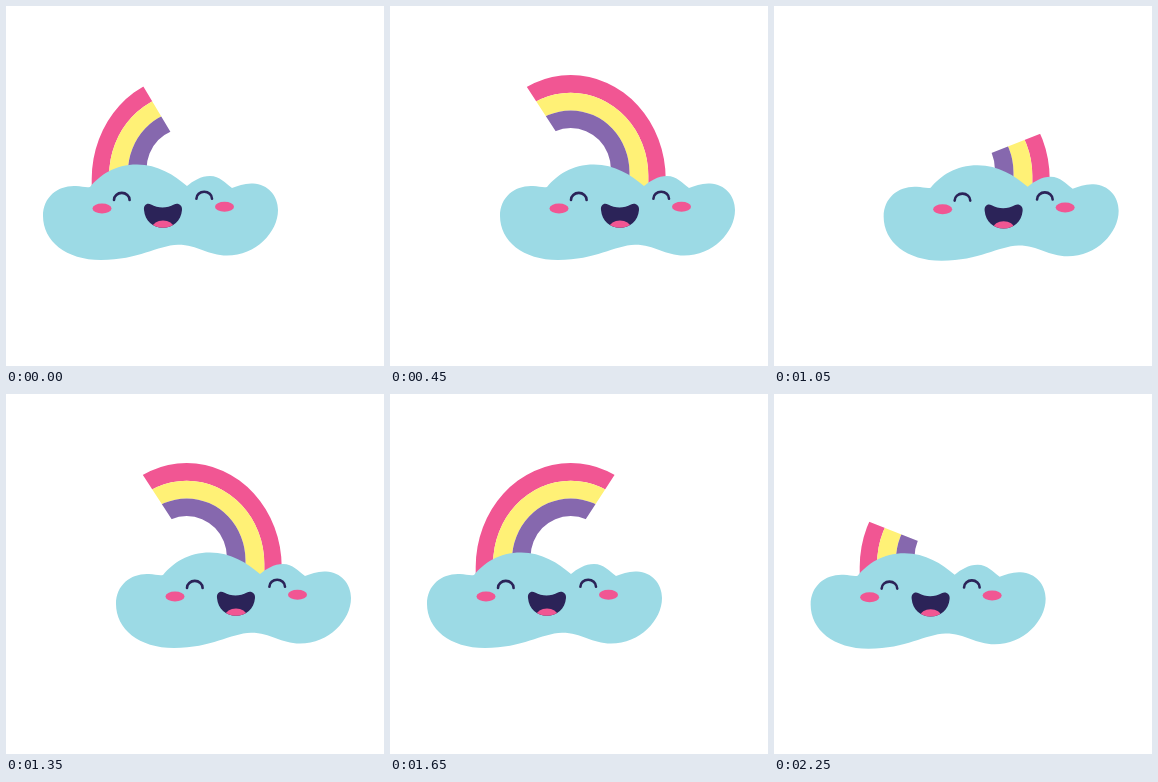
Animation of 378x360 px, one loop 2.4 s. Source, as an HTML page with a canvas:

```html
<!DOCTYPE html>
<html lang="en">
<head>
<meta charset="utf-8">
<title>Cloud and rainbow</title>
<style>
html, body { margin: 0; width: 100%; height: 100%; overflow: hidden; background: #fff; }
canvas { display: block; }
</style>
</head>
<body>
<canvas id="stage" width="378" height="360"></canvas>
<script>
const ctx = document.getElementById('stage').getContext('2d');
const STEP = 150, STEPS = 16;
const AXIS = 180.7;
const PINK = '#f15693', YELLOW = '#fff176', PURPLE = '#8668ae';
const SKY = '#9cdae5', NAVY = '#2b2358';

// Half widths of the band edges, from the outside in.
const EDGES = [95, 77.6, 58.8, 40.2];

// Each cut runs from the outer to the inner edge of the rainbow.
const CUTS = {
  tip: [96, 128, 143, 146.5],
  rising: [138, 81.5, 164, 125],
  long: [224.5, 81, 196.5, 124],
  end: [266, 126.7, 218.5, 145.8]
};

const cloud = new Path2D(`M37 210 C37 190 53 179 70 180 C76 180 80 182 84 181
  C94 169 109 158.5 131 158.5 C152 158.5 168 169 181 180 C187 175 195 170 204 170
  C214 170 219 177 226 182 C232 180 239 177 247 177.5 C262 178 272 190 272 204
  C272 226 250 249.6 221 249.6 C202 249.6 192 238.8 172 238.8
  C151 239.5 133 254 95 254 C60 254 37 235 37 210Z`);
const mouth = new Path2D(`M138 204 C137.5 199 141 196.5 145 198.5
  C152 202.5 161 202.5 168 198.5 C172 196.5 176.5 199 176 204
  C175 215 167 221.7 157 221.7 C147 221.7 139 215 138 204Z`);

function ellipse(x, y, rx, ry, color) {
  ctx.fillStyle = color;
  ctx.beginPath();
  ctx.ellipse(x, y, rx, ry, 0, 0, Math.PI * 2);
  ctx.fill();
}

function eye(x, y) {
  ctx.beginPath();
  ctx.ellipse(x, y, 7.8, 7, 0, Math.PI, Math.PI * 2);
  ctx.stroke();
}

// Keeps the part of the rainbow between its foot and the cut.
function clipAt(cut, mirrored) {
  const [x1, y1, x2, y2] = CUTS[cut];
  const nearX = x2 + (x2 - x1) * 0.4, nearY = y2 + (y2 - y1) * 0.4;
  const angle = Math.atan2(y1 - y2, x1 - x2);
  const shape = new Path2D(), side = new Path2D();
  shape.moveTo(nearX, nearY);
  shape.arc(nearX, nearY, 500, angle, Math.PI / 2, true);
  shape.closePath();
  side.addPath(shape, mirrored ? new DOMMatrix([-1, 0, 0, 1, AXIS * 2, 0]) : new DOMMatrix());
  ctx.clip(side);
}

function edge(i, reverse) {
  const ry = 104 - i * 21, cy = 173 - i * 3.3;
  ctx.ellipse(AXIS, cy, EDGES[i], ry, 0, reverse ? 0 : Math.PI, reverse ? Math.PI : 0, reverse);
}

function rainbow(cut, mirrored) {
  ctx.save();
  clipAt(cut, mirrored);
  if (cut === 'end') clipAt(cut, !mirrored);
  [PINK, YELLOW, PURPLE].forEach((color, i) => {
    const outer = EDGES[i], inner = EDGES[i + 1];
    ctx.fillStyle = color;
    ctx.beginPath();
    ctx.moveTo(AXIS - outer, 200);
    edge(i, false);
    ctx.lineTo(AXIS + outer, 200);
    ctx.lineTo(AXIS + inner, 200);
    edge(i + 1, true);
    ctx.lineTo(AXIS - inner, 200);
    ctx.fill();
  });
  ctx.restore();
}

function drawCloud(x, y) {
  ctx.save();
  ctx.translate(x, y);
  ctx.fillStyle = SKY;
  ctx.fill(cloud);
  ctx.strokeStyle = NAVY;
  ctx.lineWidth = 2.6;
  ctx.lineCap = 'round';
  eye(115.8, 193.9);
  eye(198.2, 192.7);
  ellipse(96, 202.5, 9.5, 5, PINK);
  ellipse(218.5, 200.8, 9.5, 5, PINK);
  ctx.fillStyle = NAVY;
  ctx.fill(mouth);
  ctx.clip(mouth);
  ellipse(157, 221.3, 10.5, 6.7, PINK);
  ctx.restore();
}

function draw(now) {
  const step = (Math.floor(now / STEP) + 2) % STEPS;
  // Position between the left rest (0) and the right rest (8).
  const place = step <= 8 ? step : STEPS - step;
  const fromRest = Math.min(place, 8 - place);
  const cut = [null, 'tip', 'rising', 'long', 'end'][fromRest];

  ctx.fillStyle = '#fff';
  ctx.fillRect(0, 0, 378, 360);
  if (cut) rainbow(cut, place > 4);

  const x = place === 4 ? 36.5 : place < 4 ? 0 : 73;
  const settle = fromRest < 2 ? 0.7 : 0;
  drawCloud(x - settle / 2, place === 4 ? 17.7 : settle);
}

function tick() {
  draw(performance.now());
  requestAnimationFrame(tick);
}
tick();
</script>
</body>
</html>
```
